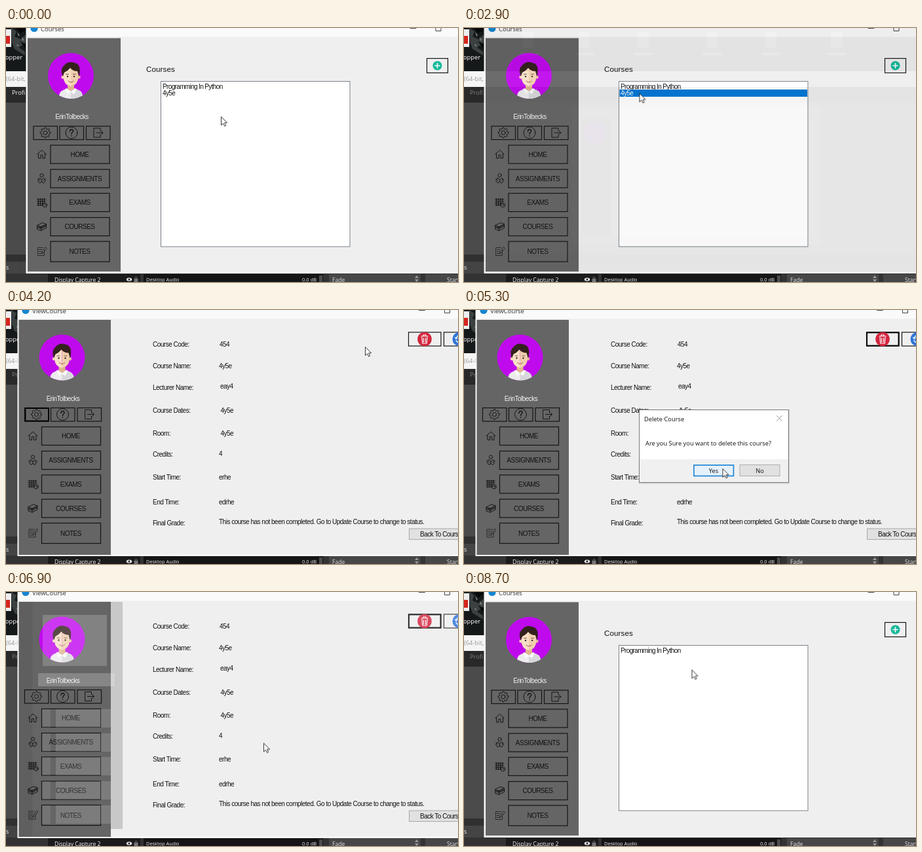
Recreate the animation shown at these times as an HTML page. Size 690 px wide and 388 px high, loop 8900 ms.

```html
<!DOCTYPE html>
<html lang="en">
<head>
<meta charset="utf-8">
<title>Course manager</title>
<style>
html, body { margin: 0; width: 100%; height: 100%; overflow: hidden; background: #3c3c3c; }
svg { display: block; width: 690px; height: 388px; }
text { font: 10px "Liberation Sans", Arial, sans-serif; letter-spacing: -.5px; fill: #111; white-space: pre; }
.ui { font-family: "Open Sans", sans-serif; letter-spacing: 0; }
.mid { text-anchor: middle; }
.line { fill: none; stroke: #151515; stroke-width: 1; stroke-linejoin: round; stroke-linecap: round; }
.anim { animation: 8900ms step-end infinite both; }

#courses { animation-name: courses; }
#view { animation-name: view; }
#pick { animation-name: pick; }
#row { animation-name: row; }
#focusGear { animation-name: focusGear; }
#focusTrash { animation-name: focusTrash; }
#dialog { animation-name: dialog; }
#hover { animation-name: hover; }
#ghost { animation-name: ghost; }
#menu { animation-name: menu; }
#cursor { animation-name: cursor; }

@keyframes courses {
  0% { opacity: 1 } 32.58% { opacity: .95 } 33.7% { opacity: .3 } 34.82% { opacity: 0 }
  78.64% { opacity: .88 } 79.77%, 100% { opacity: 1 }
}
@keyframes view {
  0% { opacity: 0 } 33.7% { opacity: .55 } 34.82% { opacity: .95 } 35.95% { opacity: 1 }
  78.64%, 100% { opacity: 0 }
}
@keyframes pick { 0% { opacity: 0 } 20.22% { opacity: 1 } 50%, 100% { opacity: 0 } }
@keyframes row { 0% { opacity: 1 } 50%, 100% { opacity: 0 } }
@keyframes focusGear { 0% { opacity: 1 } 52.8%, 100% { opacity: 0 } }
@keyframes focusTrash { 0% { opacity: 0 } 52.8%, 100% { opacity: 1 } }
@keyframes dialog { 0% { opacity: 0 } 52.8% { opacity: 1 } 67.41%, 100% { opacity: 0 } }
@keyframes hover { 0% { opacity: 0 } 58.42%, 100% { opacity: 1 } }
@keyframes ghost { 0% { opacity: 0 } 77.52% { opacity: 1 } 78.64%, 100% { opacity: 0 } }
@keyframes menu { 0% { opacity: .95 } 1.12%, 100% { opacity: .4 } }
@keyframes cursor {
  0% { transform: translate(328px, 135px); animation-timing-function: steps(9) }
  10.11% { transform: translate(272px, 101px); animation-timing-function: steps(2) }
  12.35% { transform: translate(255px, 100px) }
  13.48% { transform: translate(255px, 100px); animation-timing-function: steps(3) }
  16.85% { transform: translate(267.5px, 99.5px) }
  35.95% { transform: translate(267.5px, 99.5px); animation-timing-function: steps(6) }
  42.69% { transform: translate(380px, 88px); animation-timing-function: steps(6) }
  49.43% { transform: translate(632px, 40px) }
  52.8% { transform: translate(632px, 40px); animation-timing-function: steps(5) }
  58.42% { transform: translate(394.5px, 242px) }
  66.29% { transform: translate(394.5px, 242px); animation-timing-function: steps(2) }
  68.53% { transform: translate(393px, 230.5px) }
  83.14% { transform: translate(393px, 230.5px); animation-timing-function: steps(8) }
  92.13% { transform: translate(354px, 225px); animation-timing-function: steps(5) }
  97.75%, 100% { transform: translate(347.5px, 118.5px) }
}
</style>
</head>
<body>
<svg id="stage" viewBox="0 0 690 388" xmlns="http://www.w3.org/2000/svg"></svg>
<script>
const rect = (x, y, w, h, fill, more = '') =>
  `<rect x="${x}" y="${y}" width="${w}" height="${h}" fill="${fill}" ${more}/>`;
const frame = (x, y, w, h, width = 1.2, color = '#141414') =>
  rect(x, y, w, h, 'none', `stroke="${color}" stroke-width="${width}"`);
const disc = (x, y, r, fill) => `<circle cx="${x}" cy="${y}" r="${r}" fill="${fill}"/>`;
const path = (d, fill) => `<path d="${d}" fill="${fill}"/>`;
const line = (d, more = '') => `<path class="line" d="${d}" ${more}/>`;
const text = (x, y, s, cls = '', style = '') =>
  `<text x="${x}" y="${y}" class="${cls}" style="${style}">${s}</text>`;
const at = (x, y, s) => `<g transform="translate(${x} ${y})">${s}</g>`;
const anim = (id, s) => `<g id="${id}" class="anim">${s}</g>`;

function backdrop() {
  const icons = [90, 175, 265, 370, 460, 560].map(x =>
    rect(x, 6, 17, 24, '#6a6862') + rect(x - 6, 38, 30, 4, '#777')).join('');
  const preview = rect(165, 120, 379, 212, '#777') + rect(180, 138, 44, 180, '#555') +
    disc(200, 160, 17, '#8d1cae') + rect(224, 138, 310, 180, '#8c8c8c');
  return rect(0, 0, 690, 388, '#414141') + rect(0, 0, 690, 66, '#16191a') +
    path('M8 0L16 5L13 13L22 17L30 10V22L20 30L29 36V42L13 32L9 22Z', '#3b4041') +
    path('M15 0L22 8L30 3V0ZM21 20L30 25V31Z', '#070909') +
    path('M17 6L21 11L19 13ZM24 14L28 18L25 20ZM16 24L20 27L17 28Z', '#777d7c') + icons +
    rect(0, 2, 8, 27, '#eee') + rect(0, 12, 6, 12, '#d6251d') +
    text(-1, 48, 'opper', 'ui', 'font-size:9.3px;fill:#fff') +
    rect(0, 66, 690, 24, '#f5f5f5') +
    text(0, 81, '(64-bit,', 'ui', 'font-size:9.3px;fill:#999') +
    rect(0, 90, 690, 24, '#292929') +
    anim('menu', text(9, 102, 'Profi', 'ui', 'font-size:9.3px;fill:#fff')) +
    rect(0, 114, 690, 232, '#4b4b4b') + preview +
    rect(0, 346, 690, 11, '#303030') + rect(0, 357, 690, 18, '#444') +
    text(0, 369, 's', 'ui', 'font-size:9px;fill:#eee') +
    rect(0, 375, 690, 13, '#333') + rect(64, 376, 141, 12, '#1b1b1b') +
    text(74, 387.5, 'Display Capture 2', 'ui', 'font-size:8.6px;fill:#f4f4f4') +
    '<ellipse cx="188" cy="384" rx="4.2" ry="2.6" fill="#eee"/>' + disc(188, 384, 1.5, '#222') +
    rect(195.5, 383, 6, 5, '#777') + line('M197 383V381.5Q198.5 379 200 381.5V383', 'style="stroke:#777"') +
    rect(210, 376, 274, 12, '#151515') + rect(478, 378, 5, 10, '#4c4c4c') +
    text(214, 387, 'Desktop Audio', 'ui', 'font-size:7.4px;fill:#eee') +
    text(452, 387, '0.0 dB', 'ui', 'font-size:7.6px;fill:#eee') +
    rect(493, 376, 140, 12, '#474747') +
    text(498, 387.5, 'Fade', 'ui', 'font-size:8.6px;fill:#ddd') +
    path('M624 382L627 378L630 382ZM624 384H630L627 388Z', '#999') +
    rect(640, 376, 50, 12, '#474747') +
    text(673, 387.5, 'Start', 'ui', 'font-size:8.6px;fill:#ddd');
}

function avatar() {
  return disc(0, 0, 35, '#c00aee') +
    path('M-18 30Q-17 22 -6 20H6Q17 22 18 30Q0 40 -18 30Z', '#ececee') +
    path('M0 20H6Q17 22 18 30Q10 35 0 35Z', '#d8d8dc') +
    path('M-5 11H5V20Q0 26 -5 20Z', '#e0b48e') +
    path('M-6 19L0 25L-5 28L-9 20ZM6 19L0 25L5 28L9 20Z', '#fafafa') +
    disc(-12, 2, 2.6, '#f3d6b8') + disc(12, 2, 2.6, '#e3b893') +
    path('M-11.500 -8Q-11 -14 0 -14V16Q-11 14 -11.500 2Z', '#f7dfc6') +
    path('M0 -14Q11 -14 11.500 -8V2Q11 14 0 16Z', '#efcfae') +
    path('M-12.500 1Q-17 -11 -10 -16Q-4 -23 5 -20Q17 -18 12.500 1Q11 -3 10 -7Q3 -7 -1 -12Q-5 -7 -10 -5Q-11 -2 -12.500 1Z', '#33211d') +
    disc(-5, 1, 1.2, '#3a2925') + disc(5, 1, 1.2, '#3a2925') +
    line('M-7.500 -2.500H-3.500M3.500 -2.500H7.500', 'style="stroke:#5b3d32;stroke-width:.8"') +
    line('M-4 8Q0 12 4 8', 'style="stroke:#a3564a"');
}

function gear() {
  let d = '';
  for (let i = 0; i < 32; i++) {
    const a = (i - .5) * Math.PI / 16, r = i % 4 < 2 ? 8 : 6;
    d += `${i ? 'L' : 'M'}${(r * Math.cos(a)).toFixed(2)} ${(r * Math.sin(a)).toFixed(2)}`;
  }
  return line(d + 'Z') + '<circle class="line" r="3"/>';
}

const house = line('M-7 0L0 -6.500L7 0M-5 -1.500V6H-1.500V1H1.500V6H5V-1.500');
const reader = '<circle class="line" cy="-5" r="2.6"/>' +
  line('M-3 -1L-6 3L-3 7L0 5L3 7L6 3L3 -1L0 2ZM0 2V5M-6 0L-3 3M6 0L3 3');
const calendar = line('M-7 -5H6M-7 -2H6M-7 1H3M-7 4H2M-5 -6V5M-2 -6V5M1 -6V5M4 -6V0') +
  '<circle cx="5" cy="4" r="3.2" class="line" style="fill:#656565"/>' + line('M5 2.500V4H6.500');
const books = line('M-7 -2L1 -6L7 -4L-1 0ZM-7 -2V1L-1 3L7 -1V-4M-7 1V4L-1 6L7 2V-1M-1 0V6M-5 0L-1 1.500L6 -2');
const note = line('M4 -2V6H-6V-6H2M-4 -3H0M-4 0H-1M-4 3H1M0 2L1 -1L6 -7L8 -5L3 1Z', 'style="stroke:#2a2a2a"');

function sidebar() {
  const items = [['HOME', 179, 28, house], ['ASSIGNMENTS', 216, 28, reader],
    ['EXAMS', 252.5, 28, calendar], ['COURSES', 289.5, 28, books], ['NOTES', 326, 31, note]];
  return at(99, 73, avatar()) +
    text(100.5, 139, 'ErinTolbecks', 'mid', 'fill:#f2f2f2') +
    [42, 82, 122.5].map(x => frame(x, 150, 36.5, 20.5)).join('') +
    at(60, 160, gear()) +
    '<circle class="line" cx="100" cy="160" r="9"/>' +
    line('M97.500 158Q97.500 155 100 155Q103 155 102.500 158Q100 160 100 162M100 164.500V165', 'style="stroke-width:1.4"') +
    line('M144 157V153H134V167H144V163M138 160H148M145 157L148 160L145 163') +
    items.map(([s, y, h, icon]) => frame(68, y, 90, h) +
      text(112.5, y + h / 2 + 3.5, s, 'mid') + at(54.5, y + h / 2, icon)).join('');
}

function shell(x, title, bottom, minX) {
  return rect(x, 0, 690 - x, bottom, '#fafafa') +
    rect(x + 2, 13.5, 688 - x, bottom - 16, '#efeff0') +
    disc(x + 12.5, .5, 5.6, '#1685d1') +
    text(x + 22.5, 5, title, 'ui', 'font-size:9.5px;fill:#333') +
    line(`M${minX} .5H${minX + 9}M${minX + 39} 0V4.500H${minX + 47}V0`, 'style="stroke:#444"');
}

function courses() {
  const list = 'letter-spacing:-.64px';
  return shell(30.5, 'Courses', 375, 617) + rect(33, 15.5, 142, 356.5, '#656565') + sidebar() +
    text(214, 66.5, 'Courses', '', 'font-size:11.6px;letter-spacing:.1px') +
    frame(642.5, 46.5, 32, 22) + disc(658.5, 57.5, 7, '#14b99a') +
    line('M655 57.500H662M658.500 54V61', 'style="stroke:#fff;stroke-width:1.6"') +
    rect(236.5, 81.5, 288.5, 252.5, '#fff', 'stroke="#7b828a"') +
    text(239, 92.5, 'Programming In Python', '', list) +
    anim('row', text(239, 103, '4y5e', '', list)) +
    anim('pick', rect(237.5, 94, 286.5, 11, '#0078d7') + text(239, 103, '4y5e', '', list + ';fill:#fff'));
}

function view() {
  const rows = [['Course Code:', '454', 326, 56], ['Course Name:', '4y5e', 325, 88.5],
    ['Lecturer Name:', 'eay4', 327, 122, 119.5], ['Course Dates:', '4y5e', 327.5, 156.5],
    ['Room:', '4y5e', 327.5, 191.5], ['Credits:', '4', 325, 224, 223], ['Start Time:', 'erhe', 325, 259],
    ['End Time:', 'edrhe', 325, 297],
    ['Final Grade:', 'This course has not been completed. Go to Update Course to change to status.', 325, 328.5, 326.5]];
  const white = 'style="stroke:#fff;stroke-width:1.2"';
  return shell(17.5, 'ViewCourse', 376, 630.5) +
    rect(19.5, 15, 140.5, 359, '#656565') + at(-13.5, -.5, sidebar()) +
    anim('focusGear', frame(29.5, 150, 35.5, 19.5, 1.9, '#000')) +
    rows.map(([k, v, x, y, y2 = y]) => text(224, y, k) + text(x, y2, v)).join('') +
    frame(614.5, 34, 49.5, 21) + anim('focusTrash', frame(615, 34.5, 48.5, 20, 1.9, '#000')) +
    disc(639, 44.5, 10.8, '#d3263f') +
    line('M634 40H644M637 39.500V38H641V39.500M635 41.500L635.800 51H642.200L643 41.500M637.500 43V49M640.500 43V49', white) +
    frame(668.5, 34, 50, 21) + disc(692, 44.5, 10.5, '#2f74d8') +
    line('M687 43Q688 39 693 39M687 46Q688 50 693 50M685.500 42L687 44L689 42.500', white) +
    rect(615.5, 334, 90, 16.5, '#e1e1e1', 'stroke="#a8a8a8"') + text(632, 346, 'Back To Courses');
}

function dialog() {
  const small = 'font-size:9.3px';
  return rect(267, 152, 230, 113.5, '#000', 'opacity=".12"') +
    rect(267.5, 152.5, 228, 111, '#fff', 'stroke="#777"') + rect(268, 228, 227, 35, '#f0f0f0') +
    text(275, 169.5, 'Delete Course', 'ui', small) +
    line('M477.500 161.500L485.500 169.500M485.500 161.500L477.500 169.500', 'style="stroke:#999"') +
    text(277, 207, 'Are you Sure you want to delete this course?', 'ui', small) +
    rect(351, 237, 60.5, 16.5, '#e1e1e1') + anim('hover', rect(351, 237, 60.5, 16.5, '#e5f1fb')) +
    frame(351, 237, 60.5, 16.5, 1.6, '#1580d4') +
    rect(421, 236.5, 61, 17, '#e1e1e1', 'stroke="#adadad"') +
    text(381, 249, 'Yes', 'ui mid', small) + text(451.5, 249, 'No', 'ui mid', small);
}

// Half-painted panels while the course list reopens
function ghost() {
  const veil = (x, y, w, h, a) => rect(x, y, w, h, '#fff', `opacity="${a}"`);
  return rect(160, 15, 18, 347, '#777', 'opacity=".32"') +
    rect(19.5, 15, 21, 359, '#000', 'opacity=".05"') +
    veil(56, 35, 98, 78, .19) + veil(49, 124, 117, 20, .22) + veil(614, 33, 76, 23, .17) +
    [179, 216, 252, 289, 326].map(y => veil(76, y, 84, 28, .15) + veil(55, y, 13, 28, .1)).join('');
}

const pointer = '<path d="M.5 .5V13.500L3.500 10.700L5.700 15L7.700 14L5.600 9.800H9.600Z" fill="#fff" stroke="#222" stroke-width=".9"/>';

document.getElementById('stage').innerHTML = backdrop() + anim('courses', courses()) +
  anim('view', view()) + anim('dialog', dialog()) + anim('ghost', ghost()) + anim('cursor', pointer);
</script>
</body>
</html>
```
